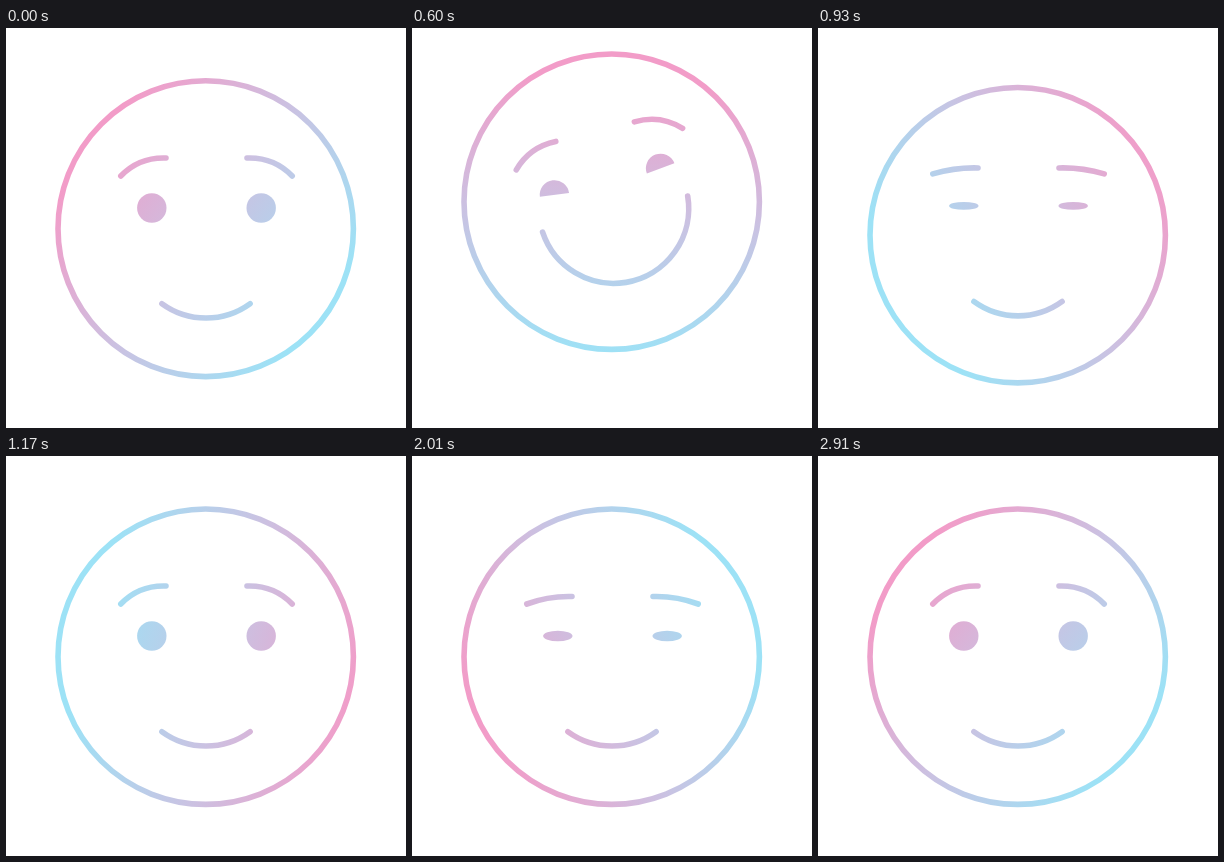
Recreate the animation shown at these times as an HTML page with a canvas. Size 400x400 px, loop 5150 ms.

```html
<!DOCTYPE html>
<html lang="en">
<head>
<meta charset="utf-8">
<title>Smiling face</title>
<style>
  html, body { margin: 0; width: 100%; height: 100%; overflow: hidden; background: #fff; }
  canvas { display: block; width: 400px; height: 400px; }
</style>
</head>
<body>
<canvas width="400" height="400"></canvas>
<script>
const ctx = document.querySelector('canvas').getContext('2d');
const LOOP = 5150, SPIN = 2910, BLINK = 150, LAG = 58;
const RAD = Math.PI / 180;

// 0 to 1 between two times, eased at both ends.
function ramp(t, start, end) {
  const u = Math.min(1, Math.max(0, (t - start) / (end - start)));
  return u * u * (3 - 2 * u);
}

// Rises over a..b, holds, falls over c..d.
const pulse = (t, a, b, c, d) => ramp(t, a, b) - ramp(t, c, d);

// A dip, a jump, and a landing that dips again.
const jump = (t, dip) =>
  dip * (pulse(t, 0, 120, 120, 306) + pulse(t, 735, 925, 925, 1110))
  - 27 * pulse(t, 120, 306, 735, 925);

const ringY = t => jump(t, 6.5);
const faceY = t => jump(t - LAG, 3.5);
const joy = t => pulse(t, 120, 387, 670, 910);
const tilt = t => -14 * pulse(t, 240, 440, 690, 900);
const blink = (t, close, open) => pulse(t, close, close + BLINK, open, open + BLINK);
const lidDrop = t => blink(t, 172, 332) + blink(t, 700, 880) + blink(t, 1650, 1950);

// The ring stretches with its speed.
function drawRing(t) {
  const stretch = 0.57 * Math.abs(ringY(t + 15) - ringY(t - 15));
  ctx.beginPath();
  ctx.ellipse(199.7, 200.7 + ringY(t), 147.7, 147.7 + stretch, 0, 0, 2 * Math.PI);
  ctx.stroke();
}

function drawBrow(side, drop, lift) {
  ctx.beginPath();
  ctx.moveTo(side * 85.7, -52.5 - lift);
  ctx.quadraticCurveTo(side * (67.5 - 6 * drop), -71.5 + 17 * drop - lift,
    side * 40.5, -70.5 + 16.5 * drop - lift);
  ctx.stroke();
}

function drawEye(side, drop, half) {
  ctx.save();
  ctx.translate(side * 54.7, -20.5);
  if (half) ctx.rotate(-side * 6.7 * RAD);
  ctx.scale(1, Math.max(1 - drop, 0.03));
  ctx.beginPath();
  ctx.arc(0, 0, 14.7, Math.PI, (half ? 2 : 3) * Math.PI);
  ctx.fill();
  ctx.restore();
}

function drawMouth(joy) {
  const angle = 36 + 49.5 * joy;
  ctx.beginPath();
  ctx.arc(-0.5, 14.5 - 7.5 * joy, 75, (90 - angle) * RAD, (90 + angle) * RAD);
  ctx.stroke();
}

function drawFace(t) {
  const drop = lidDrop(t), half = t > 327 && t < 865;
  ctx.save();
  ctx.translate(200.5, 200.5 + faceY(t));
  ctx.rotate(tilt(t) * RAD);
  for (const side of [-1, 1]) {
    drawBrow(side, drop, 1.5 * joy(t));
    drawEye(side, drop, half);
  }
  drawMouth(joy(t));
  ctx.restore();
}

// Colour everything drawn so far with one gradient that turns once, drifting to its pink end midway.
function tint(t) {
  const x = Math.min(1, t / SPIN);
  const turn = (1 - Math.cos(Math.PI * x ** 0.85)) / 2;
  const angle = (216 + 360 * turn) * RAD;
  const drift = 20 * Math.sin(Math.PI * turn);
  const along = d => [200 + d * Math.cos(angle), 200 + d * Math.sin(angle)];
  const gradient = ctx.createLinearGradient(...along(drift + 138), ...along(drift - 138));
  ['#f29cc8', '#cac2e2', '#9de2f6'].forEach((c, i) => gradient.addColorStop(i / 2, c));
  ctx.save();
  ctx.globalCompositeOperation = 'source-in';
  ctx.fillStyle = gradient;
  ctx.fillRect(0, 0, 400, 400);
  ctx.restore();
}

ctx.lineWidth = 5.6;
ctx.lineCap = 'round';

function frame() {
  const t = performance.now() % LOOP;
  ctx.clearRect(0, 0, 400, 400);
  drawRing(t);
  drawFace(t);
  tint(t);
  requestAnimationFrame(frame);
}
frame();
</script>
</body>
</html>
```
